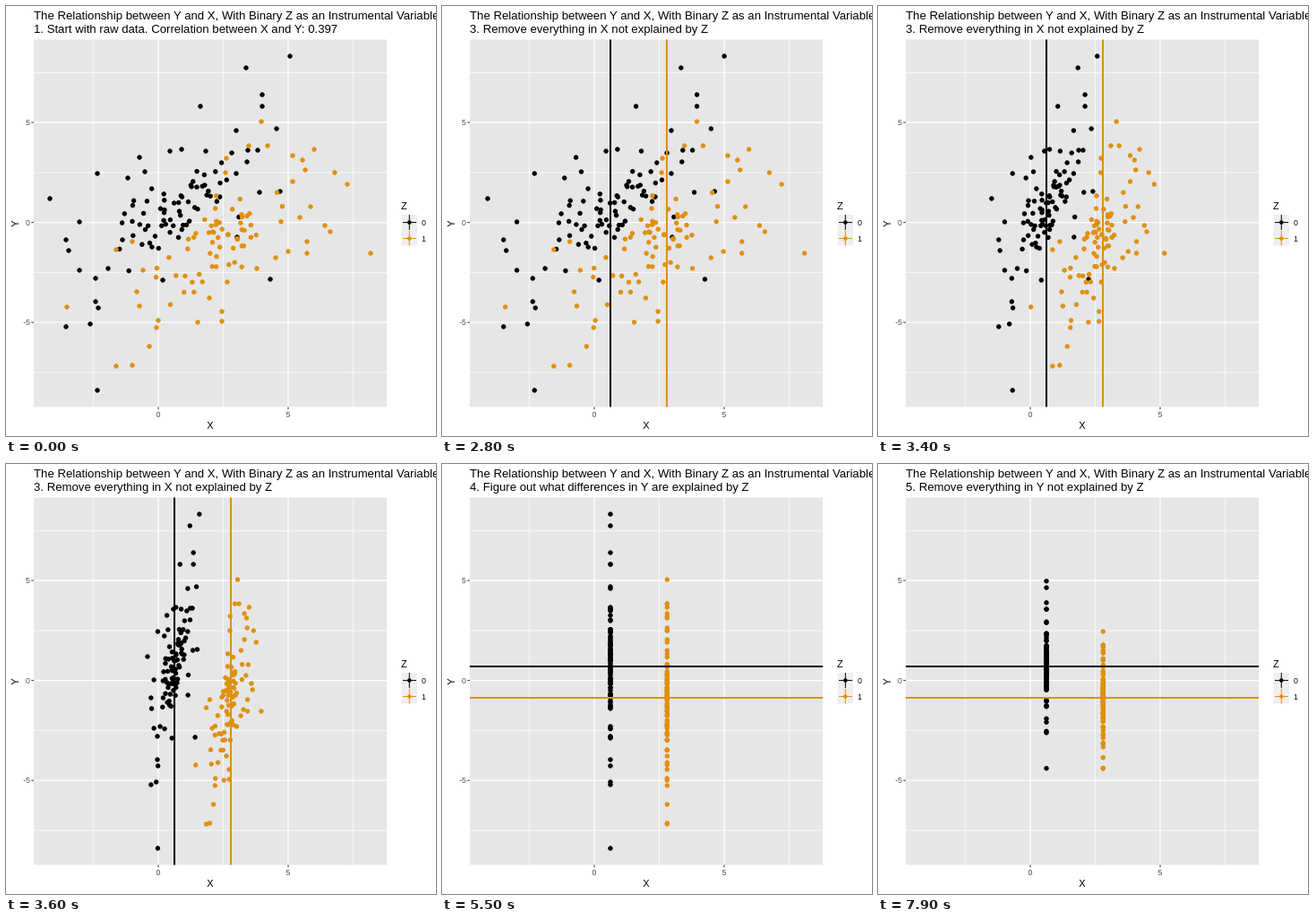
Recreate the animation shown at these times as an HTML page. Size 480 by 480 pixels, loop 8 s.

```html
<!DOCTYPE html>
<html lang="en">
<head>
<meta charset="utf-8">
<title>Instrumental variable</title>
<style>
  html, body { margin: 0; width: 100%; height: 100%; overflow: hidden; background: #fff; }
  svg { display: block; width: 100vw; height: 100vh; font-family: "Liberation Sans", Arial, Helvetica, sans-serif; }
  .title { font-size: 13.2px; }
  .axis { font-size: 11px; }
  .tick { font-size: 8.8px; fill: #4d4d4d; }
  .end { text-anchor: end; }
  .mid { text-anchor: middle; }
  .z0 { fill: #000; stroke: #000; }
  .z1 { fill: #df900d; stroke: #df900d; }
  circle { stroke: none; }
</style>
</head>
<body>
<svg viewBox="0 0 480 480">
  <text class="title" x="31" y="15">The Relationship between Y and X, With Binary Z as an Instrumental Variable</text>
  <text class="title" x="31" y="30" id="step"></text>

  <path fill="#e6e6e6" d="M31 37.5H425V447.5H31z"/>
  <g stroke="#fff">
    <path stroke-width=".7" d="M97.5 37.5V447.5M242.5 37.5V447.5M387.5 37.5V447.5M31 74.5H425M31 186H425M31 297.5H425M31 409H425"/>
    <path stroke-width="1.3" d="M170 37.5V447.5M315 37.5V447.5M31 130H425M31 241.6H425M31 353.2H425"/>
  </g>
  <path stroke="#333" d="M28.3 130H31M28.3 241.6H31M28.3 353.2H31M170 447.5V450.2M315 447.5V450.2"/>

  <g class="tick">
    <text class="end" x="27" y="133.2">5</text>
    <text class="end" x="27" y="244.8">0</text>
    <text class="end" x="27" y="356.4">-5</text>
    <text class="mid" x="170" y="459">0</text>
    <text class="mid" x="315" y="459">5</text>
  </g>
  <text class="axis mid" x="228" y="472">X</text>
  <text class="axis mid" transform="translate(13.5 243) rotate(-90)">Y</text>

  <text class="axis" x="441" y="227">Z</text>
  <path fill="#efefef" d="M441.5 233H459V267.5H441.5z"/>
  <g class="z0"><path d="M443 241.6H458M450.3 233V250"/><circle cx="450.3" cy="241.6" r="2.3"/></g>
  <g class="z1"><path d="M443 259.5H458M450.3 251V267.5"/><circle cx="450.3" cy="259.5" r="2.3"/></g>
  <text x="464" y="245" font-size="8.8">0</text>
  <text x="464" y="263" font-size="8.8">1</text>

  <g id="dots"></g>
  <g id="xMeans" stroke-width="2">
    <path class="z0" d="M188 37.5V447.5"/>
    <path class="z1" d="M251 37.5V447.5"/>
  </g>
  <g id="yMeans" stroke-width="2">
    <path class="z0" d="M31 226H425"/>
    <path class="z1" d="M31 261H425"/>
  </g>
</svg>
<script>
const $ = id => document.getElementById(id);
const LOOP = 8000, FRAME = 100, MOVE = 13;

const titles = [
  [7400, '5. Remove everything in Y not explained by Z'],
  [5100, '4. Figure out what differences in Y are explained by Z'],
  [2800, '3. Remove everything in X not explained by Z'],
  [500, '2. Figure out what differences in X are explained by Z'],
  [0, '1. Start with raw data. Correlation between X and Y: 0.397']
];

// Outlying points are placed as x, y pairs; the dense core is a seeded cloud
// scattered around a sloping trend.
const groups = [
  { mean: [188, 226], core: { n: 62, x: 190, y: 231, w: 74, slope: -.45, spread: 55 },
    edge: [317,56, 268,69, 286,99, 286,112, 217,112, 302,137, 257,139, 49,215, 102,187,
      82,241, 67,261, 70,273, 82,295, 100,304, 100,330, 103,337, 67,358, 94,355, 102,429,
      149,169, 136,192, 155,185, 183,162, 196,160, 223,162, 252,164, 270,161, 281,161,
      269,174, 283,208, 306,207, 295,305, 258,258, 175,306, 114,293, 130,261, 257,187] },
  { mean: [251.3, 261], core: { n: 60, x: 240, y: 265, w: 84, slope: -.6, spread: 58 },
    edge: [407,276, 381,199, 367,186, 344,160, 320,167, 331,172, 334,183, 285,129, 271,156,
      292,156, 246,170, 245,186, 320,196, 340,224, 356,245, 362,252, 328,236, 336,263,
      336,276, 315,274, 301,281, 280,293, 241,341, 241,352, 214,353, 227,326, 170,351,
      168,359, 160,380, 141,401, 123,402, 68,336, 149,335, 146,319, 153,295, 123,272, 141,263] }
];

let seed = 20;
const rand = () => (seed = (seed * 16807) % 2147483647) / 2147483647;
const bell = () => rand() + rand() - 1;

const dots = [];
function addDot(x, y, z) {
  const el = document.createElementNS('http://www.w3.org/2000/svg', 'circle');
  el.setAttribute('class', 'z' + z);
  el.setAttribute('r', 2.3);
  $('dots').append(el);
  dots.push({ el, x, y, mean: groups[z].mean });
}

groups.forEach(({ core, edge }, z) => {
  for (let i = 0; i < edge.length; i += 2) addDot(edge[i], edge[i + 1], z);
  for (let i = 0; i < core.n; i++) {
    const dx = bell() * core.w;
    addDot(core.x + dx, core.y + core.slope * dx + bell() * core.spread, z);
  }
});

// Sine ease in and out over MOVE frames; the first step shows at `start`.
function ease(t, start) {
  const k = Math.min(1, Math.max(0, ((t - start) / FRAME + 1) / MOVE));
  return (1 - Math.cos(Math.PI * k)) / 2;
}
const mix = (a, b, p) => (a + (b - a) * p).toFixed(2);
const show = (id, on) => $(id).setAttribute('visibility', on ? 'visible' : 'hidden');

let last = -1;
function draw(now) {
  const t = Math.floor(now % LOOP / FRAME) * FRAME;
  if (t !== last) {
    last = t;
    $('step').textContent = titles.find(([at]) => t >= at)[1];
    show('xMeans', t >= 900 && t < 5100);
    show('yMeans', t >= 5500);
    const px = ease(t, 2800), py = ease(t, 7400);
    for (const d of dots) {
      d.el.setAttribute('cx', mix(d.x, d.mean[0], px));
      d.el.setAttribute('cy', mix(d.y, d.mean[1], py));
    }
  }
}

const begin = performance.now();
function tick() {
  draw(performance.now() - begin);
  requestAnimationFrame(tick);
}
tick();
</script>
</body>
</html>
```
